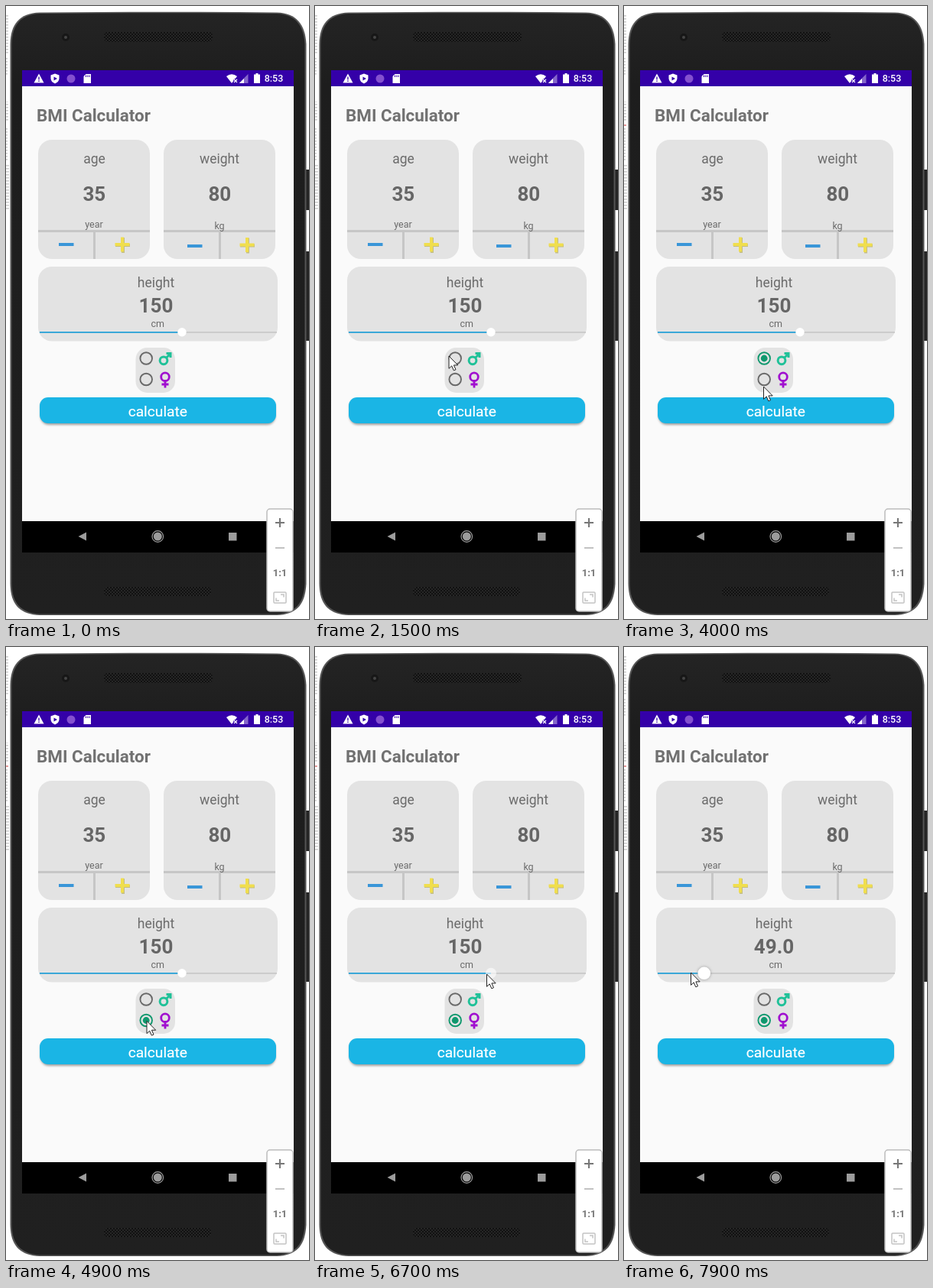
Recreate the animation shown at these times as an HTML page. Size 396 by 802 pixels, loop 8000 ms.

```html
<!DOCTYPE html>
<html lang="en">
<head>
<meta charset="utf-8">
<title>BMI Calculator</title>
<style>
  html, body { margin: 0; width: 100%; height: 100%; overflow: hidden; background: #fff; }
  svg { display: block; width: 396px; height: 802px; }
  text { font-family: Roboto, "Open Sans", sans-serif; fill: #6b6b6b; text-anchor: middle; }
  .label { font-size: 17.5px; }
  .value { font-size: 26px; font-weight: 700; fill: #666; }
  .unit { font-size: 12.5px; }
  .card { fill: #e3e3e3; }
  .rule { fill: #c6c6c6; }
  .minus { fill: #3a96d8; }
  .ring { fill: none; stroke-width: 1.9; }
  .dot { fill: #0f986e; }
  .ripple { fill: #777; }
</style>
</head>
<body>
<svg viewBox="0 0 396 802">
  <defs>
    <linearGradient id="body" x2="0" y2="1">
      <stop offset="0" stop-color="#242424"/>
      <stop offset=".12" stop-color="#1d1d1d"/>
      <stop offset="1" stop-color="#202020"/>
    </linearGradient>
    <pattern id="mesh" width="4" height="4" patternUnits="userSpaceOnUse">
      <rect width="4" height="4" fill="#262626"/>
      <circle cx="1" cy="1" r="1" fill="#0a0a0a"/>
      <circle cx="3" cy="3" r="1" fill="#0a0a0a"/>
    </pattern>
    <pattern id="ticks" width="4" height="4" patternUnits="userSpaceOnUse">
      <rect width="4" height="1.6" fill="#cfcfcf"/>
    </pattern>
    <filter id="soft" x="-50%" y="-50%" width="200%" height="200%"><feGaussianBlur stdDeviation="1.6"/></filter>
    <g id="plus">
      <path d="M-9 1H10M1-9V11" stroke="#c3bd86" stroke-width="4"/>
      <path d="M-9.500 0H9.500M0-9.500V9.500" stroke="#f0de4e" stroke-width="4"/>
    </g>
    <g id="counter">
      <rect class="card" width="146" height="156" rx="18"/>
      <rect class="rule" y="118" width="146" height="3"/>
      <rect class="rule" x="72" y="120" width="3" height="36"/>
    </g>
  </defs>

  <!-- window strip beside the phone -->
  <path d="M0 12h3v52h-3zM0 68h2v22h-2zM0 125h3v26h-3zM0 160h2v43h-2zM0 208h4v58h-4z" fill="url(#ticks)"/>
  <rect id="mark" y="155" width="3" height="2" fill="#e39a9a"/>

  <!-- phone -->
  <path d="M391 214h5v53h-5zM391 321h5v117h-5z" fill="#252525"/>
  <path d="M44 8.500C150 7.500 250 7.500 354 8.500C380 9.500 391 24 392.500 50V756C391 782 381 796 354 797H44C17 796 6 782 5.500 756V50C6 24 17 9.500 44 8.500Z" fill="#555"/>
  <path d="M44 10C150 9 250 9 354 10C378 11 389 25 390.500 50V756C389 781 379 794 354 795.500H44C19 794 8 781 7.500 756V50C8 25 19 11 44 10Z" fill="url(#body)"/>
  <rect x="128" y="34" width="142" height="13" rx="5" fill="url(#mesh)"/>
  <rect x="128" y="760" width="140" height="12" rx="5" fill="url(#mesh)"/>
  <circle cx="78" cy="41" r="5" fill="#171717"/>
  <circle cx="78" cy="41" r="2" fill="#454545"/>

  <!-- screen -->
  <rect x="21" y="84" width="355" height="631" fill="#fafafa"/>
  <rect x="21" y="84" width="355" height="21" fill="#3400a8"/>
  <rect x="21" y="674" width="355" height="41"/>

  <!-- status bar -->
  <g fill="#fff">
    <path d="M43 88.500L49.500 100.500H36.500Z"/>
    <path d="M43 92.500v4M43 97.500v1.500" stroke="#3400a8" stroke-width="1.300"/>
    <path d="M64 88.500L69.500 90.500V95Q69 99.500 64 101.500Q59 99.500 58.500 95V90.500Z"/>
    <path d="M62.500 92.500L67 95L62.500 97.500Z" fill="#3400a8"/>
    <circle cx="85" cy="95" r="5.500" fill="#8450cf"/>
    <path d="M104.500 89H111V101H101.500V92Z"/>
    <path d="M104.500 90.500v2.500M106.800 90.500v2.500M109 90.500v2.500" stroke="#3400a8"/>
    <path d="M288 92Q295 86.500 302 92L295 101Z"/>
    <path d="M298 96l4 4m0-4l-4 4" stroke="#3400a8" stroke-width="3"/>
    <path d="M298 96l4 4m0-4l-4 4" stroke="#fff" stroke-width="1.200"/>
    <path d="M316.500 89V101H304.500Z" opacity=".4"/>
    <path d="M311 95V101H305Z"/>
    <path d="M326.500 88h3v1.500h2.500V101h-8V89.500h2.500Z"/>
    <text x="350" y="99.300" style="font-size:12.500px;font-weight:500;fill:#fff">8:53</text>
  </g>

  <text x="40" y="151" style="font-size:22.400px;font-weight:700;fill:#717171;text-anchor:start">BMI Calculator</text>

  <!-- age and weight -->
  <use href="#counter" x="42" y="175"/>
  <use href="#counter" x="206" y="175"/>
  <text class="label" x="115.500" y="206">age</text>
  <text class="value" x="115.300" y="254.500">35</text>
  <text class="unit" x="115" y="290">year</text>
  <rect class="minus" x="69" y="310" width="19.500" height="4"/>
  <use href="#plus" x="152" y="312"/>
  <text class="label" x="279" y="206">weight</text>
  <text class="value" x="279.300" y="254.500">80</text>
  <text class="unit" x="279" y="292">kg</text>
  <rect class="minus" x="237" y="312" width="19.500" height="4"/>
  <use href="#plus" x="315" y="312.500"/>

  <!-- height -->
  <rect class="card" x="42" y="341" width="313" height="97.500" rx="18"/>
  <text class="label" x="196" y="368">height</text>
  <text class="value" id="height" x="196" y="401">150</text>
  <text class="unit" x="198.300" y="420">cm</text>
  <rect x="44" y="426.200" width="310" height="1.500" fill="#c5c5c5"/>
  <rect id="fill" x="44" y="426" width="186" height="1.800" fill="#2ba4d9"/>
  <g id="knob">
    <circle id="halo" r="9.500" fill="#999" opacity=".5" filter="url(#soft)"/>
    <circle id="thumb" r="6" fill="#fff"/>
  </g>

  <!-- gender -->
  <rect class="card" x="169.500" y="447" width="51.500" height="59" rx="15"/>
  <g id="male" transform="translate(183.200 461)"><circle class="ripple"/><circle class="ring" r="7.800"/><circle class="dot"/></g>
  <g id="female" transform="translate(183.200 488.500)"><circle class="ripple"/><circle class="ring" r="7.800"/><circle class="dot"/></g>
  <g fill="none" stroke="#20c198" stroke-width="3">
    <circle cx="206" cy="463.800" r="4.900"/>
    <path d="M209.500 460.300L214.500 455.300M209.500 454.500H215V460"/>
  </g>
  <g fill="none" stroke="#a00fcf" stroke-width="2.800">
    <circle cx="208" cy="485.200" r="5.300"/>
    <path d="M208 490.500V499.500M203.500 495H212.500"/>
  </g>

  <!-- button -->
  <rect x="45" y="514" width="307" height="34" rx="11" fill="#777" opacity=".7" filter="url(#soft)"/>
  <rect x="44" y="512" width="309" height="34" rx="11" fill="#1ab5e5"/>
  <text x="198.300" y="537" style="font-size:19.200px;fill:#fff;stroke:#fff;stroke-width:.2px">calculate</text>

  <!-- navigation -->
  <g fill="#9c9c9c">
    <path d="M94.500 694L105 688.500V699.500Z"/>
    <circle cx="198.300" cy="694" r="5.500"/>
    <circle cx="198.300" cy="694" r="7.300" fill="none" stroke="#9c9c9c" stroke-width="1.200"/>
    <rect x="291" y="689" width="10.500" height="10.500"/>
  </g>

  <!-- zoom panel -->
  <rect x="341" y="658" width="34" height="134" rx="4" fill="#fff" stroke="#bcbcbc" stroke-width="1.500"/>
  <path d="M352 676H364M358 670V682" stroke="#777" stroke-width="2"/>
  <path d="M352 709H364" stroke="#c2c2c2" stroke-width="2"/>
  <text x="358" y="746" style="font-size:13px;font-weight:700;fill:#777">1:1</text>
  <g fill="none" stroke="#c4c4c4" stroke-width="1.500">
    <rect x="350" y="767" width="16" height="14" rx="1"/>
    <path d="M353 774.500V778H357M359 770H363V773.500"/>
  </g>

  <path id="cursor" d="M0 0V16.300L3.700 12.900L6.300 18.800L9 17.700L6.400 11.900H11.700Z" fill="#fff" stroke="#222" stroke-width="1"/>
</svg>
<script>
  const LOOP = 8000, STEP = 100;
  const $ = id => document.getElementById(id);

  // [time, x, y]
  const pointer = [
    [500, 303, 320], [900, 258, 392], [1300, 190, 452], [1500, 175, 458],
    [2100, 175, 458], [2200, 177, 453], [2300, 179.500, 457], [3200, 179.500, 457],
    [3500, 184, 508], [3900, 184, 508], [4000, 182.500, 498], [4200, 182.500, 487],
    [4800, 182.500, 487], [5100, 187, 494], [5500, 198, 483], [5600, 200, 479],
    [6000, 218, 444], [6300, 224.500, 428], [6700, 224.500, 428], [7100, 170, 434],
    [7500, 113, 430], [7900, 87.500, 426]
  ];
  // [time, height]
  const slider = [[6800, 150], [7200, 110], [7500, 76], [7800, 53], [7900, 49]];

  function sample(keys, t) {
    if (t <= keys[0][0]) return keys[0].slice(1);
    const i = keys.findIndex(k => k[0] > t);
    if (i < 0) return keys[keys.length - 1].slice(1);
    const a = keys[i - 1], b = keys[i], p = (t - a[0]) / (b[0] - a[0]);
    return a.slice(1).map((v, n) => v + (b[n + 1] - v) * p);
  }

  const clamp = v => Math.max(0, Math.min(1, v));

  function radio(id, t, on, off) {
    const [ripple, ring, dot] = $(id).children;
    const checked = t >= on && t < off;
    const p = (t - on + 200) / 500;
    ripple.setAttribute('r', 11 * clamp(p * 2));
    ripple.setAttribute('opacity', p > 0 && p < 1 ? .25 * (1 - p) : 0);
    ring.setAttribute('stroke', checked ? '#0f986e' : '#696969');
    dot.setAttribute('r', checked ? 4.4 * clamp((t - on + 100) / 200) : 0);
  }

  function draw(t) {
    const [x, y] = sample(pointer, t);
    $('cursor').setAttribute('transform', `translate(${x} ${y})`);
    $('cursor').style.display = t < 500 ? 'none' : '';
    $('mark').style.display = t < 2200 ? 'none' : '';

    const value = Math.round(sample(slider, t)[0]);
    const knobX = 44 + value * 1.24;
    const pressed = t >= 6800;
    $('height').textContent = value < 150 ? value.toFixed(1) : '150';
    $('fill').setAttribute('width', knobX - 44);
    $('knob').setAttribute('transform', `translate(${knobX} 426.8)`);
    $('halo').style.display = pressed ? '' : 'none';
    $('thumb').setAttribute('r', pressed ? 8.3 : t >= 6700 ? 7 : 5.7);
    $('thumb').setAttribute('opacity', t === 6700 ? .6 : 1);

    radio('male', t, 3200, 4300);
    radio('female', t, 4300, LOOP);
  }

  const start = performance.now();
  function tick() {
    const t = (performance.now() - start) % LOOP;
    draw(Math.floor(t / STEP) * STEP);
    requestAnimationFrame(tick);
  }
  tick();
</script>
</body>
</html>
```
